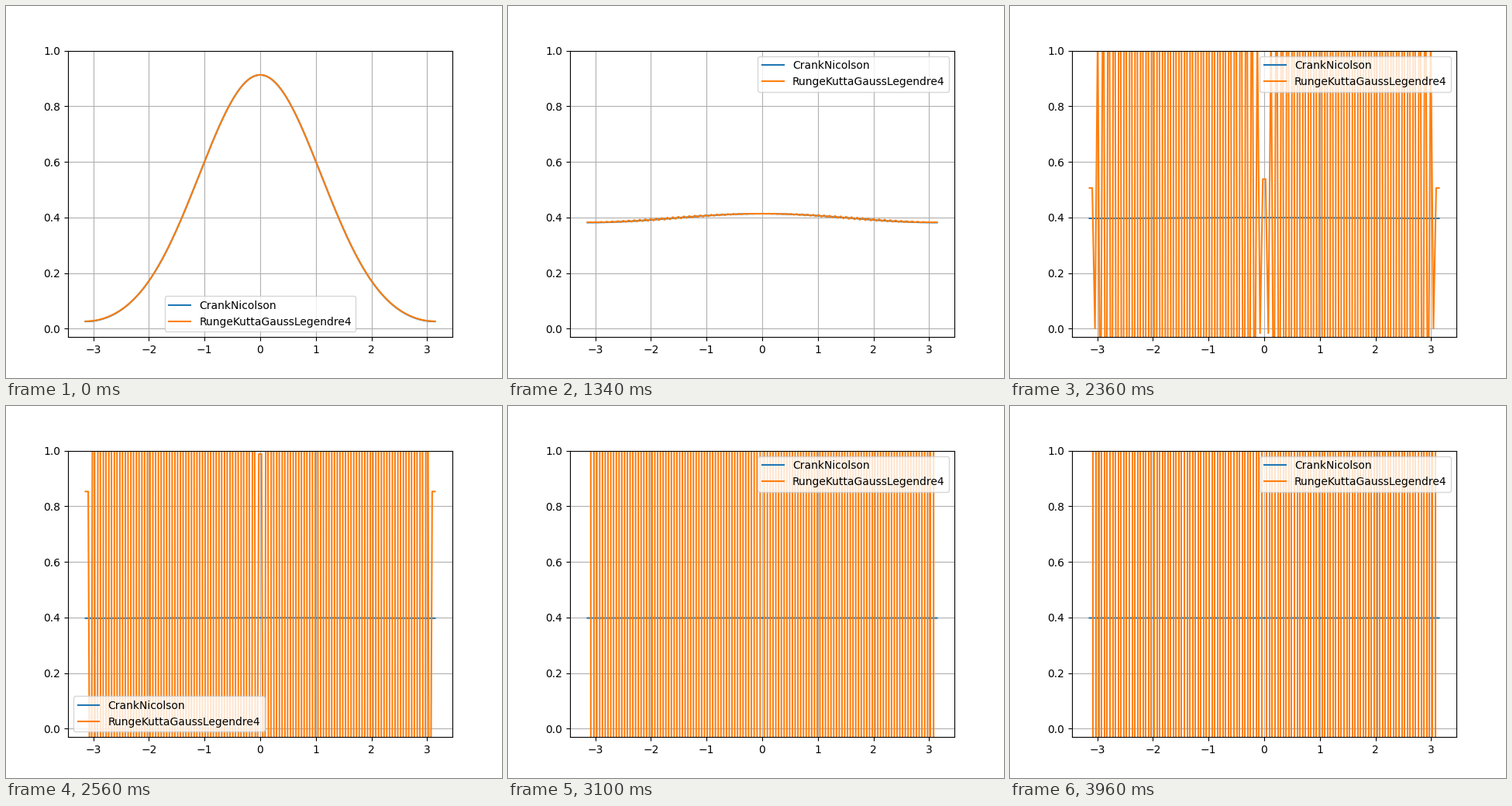
Write a matplotlib script that moves like this. It is 640 px wide and 480 px high and loops after 3980 ms.

```python
import numpy as np
import matplotlib.pyplot as plt
from matplotlib.animation import FuncAnimation

FRAMES, INTERVAL = 199, 20
DT = 0.05
POINTS = 128

x = np.linspace(-np.pi, np.pi, POINTS)

# Cosine series of a Gaussian pulse with insulated ends
modes = np.arange(1, 13)
fine = (np.arange(4000) + 0.5) / 4000 * np.pi
pulse = np.exp(-fine**2 / 2)
mean = pulse.mean()
coefs = 2 * (np.cos(np.outer(modes, fine)) @ pulse) / fine.size
basis = np.cos(np.outer(x, modes))


def heat(t):
    return mean + basis @ (coefs * np.exp(-modes**2 * t))


def edge_error(t):
    return 0.0095 * t * np.exp(-t) * (1 - np.cos(x))**2 / 4


def instability(i):
    """Grid-scale zigzag growing exponentially, mirrored about x = 0."""
    j = np.arange(1, POINTS // 2)
    theta = np.pi * (j - 0.62) / 62.88
    skew = 0.035 * np.exp((97 - i) / 15)
    envelope = np.sin(theta) + min(skew, 0.1) * np.sin(2 * theta)
    half = 0.276 * 1.1546**(i - 97) * (-1.0)**(j - 1) * envelope
    half = np.concatenate([half[:1], half])
    return np.concatenate([half, half[::-1]])


fig, ax = plt.subplots(figsize=(6.4, 4.8), dpi=100)
crank, = ax.plot(x, heat(0), label="CrankNicolson")
gauss, = ax.plot(x, heat(0), label="RungeKuttaGaussLegendre4")
ax.set_ylim(-0.03, 1)
ax.grid()
ax.legend(loc="best")


def update(i):
    t = (i + 2) * DT
    u = heat(t)
    crank.set_ydata(u - edge_error(t))
    gauss.set_ydata(u + instability(i))
    return crank, gauss


anim = FuncAnimation(fig, update, frames=FRAMES, interval=INTERVAL,
                     repeat=True, repeat_delay=0, blit=False)
plt.show()
```
